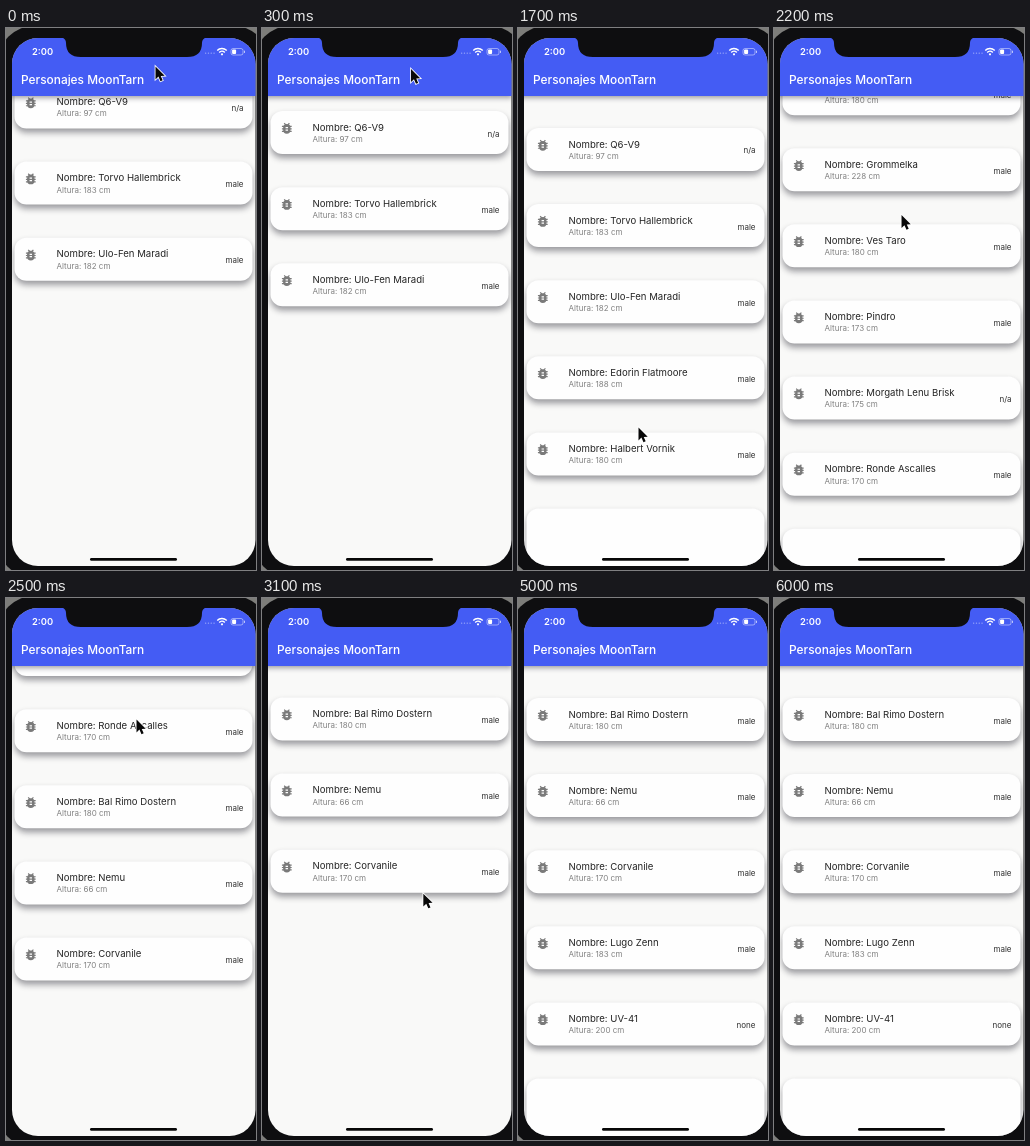
An HTML page with a canvas that plays this animation: 250 by 542 pixels, repeating every 6.5 s.

```html
<!DOCTYPE html>
<html lang="es">
<head>
<meta charset="utf-8">
<title>Personajes</title>
<style>
html, body { margin: 0; width: 100%; height: 100%; overflow: hidden; background: #0e0e10; }
canvas { display: block; width: 250px; height: 542px; }
</style>
</head>
<body>
<canvas id="stage"></canvas>
<script>
const W = 250, H = 542, LOOP = 6500;
const ROW = 76.1, FIRST_TOP = 100, CARD_H = 43, BAR_BOTTOM = 68;
const FONT = 'Inter, Roboto, sans-serif';
const BLUE = '#445cf4', PAPER = '#f9f9f8', BEZEL = '#0e0e10';
const WHITE = '#fff', CARD = '#fefefe', ICON = '#7a7a7a';

const people = [
  ['Q6-V9', 97, 'n/a'],
  ['Torvo Hallembrick', 183, 'male'],
  ['Ulo-Fen Maradi', 182, 'male'],
  ['Edorin Flatmoore', 188, 'male'],
  ['Halbert Vornik', 180, 'male'],
  ['Grommelka', 228, 'male'],
  ['Ves Taro', 180, 'male'],
  ['Pindro', 173, 'male'],
  ['Morgath Lenu Brisk', 175, 'n/a'],
  ['Ronde Ascalles', 170, 'male'],
  ['Bal Rimo Dostern', 180, 'male'],
  ['Nemu', 66, 'male'],
  ['Corvanile', 170, 'male'],
  ['Lugo Zenn', 183, 'male'],
  ['UV-41', 200, 'none'],
  ['Ossim', 190, 'male']
];

// Time in ms, then the values at that time.
const scrollKeys = [
  [0, 42.5], [100, 41], [300, 17], [500, 4], [700, 0], [1700, 0],
  [1900, 60], [2100, 240], [2300, 480], [2500, 673], [2700, 784],
  [2800, 792], [3100, 761.5], [3300, 761]
];
const cursorKeys = [
  [0, 149.5, 38.5], [700, 147.5, 50.5], [900, 146, 70], [1500, 121, 392],
  [1700, 120.5, 399.5], [1900, 122, 350], [2300, 129, 150], [2500, 130.5, 121.5],
  [2700, 138, 150], [3100, 161.3, 295.5], [3300, 165, 312], [3500, 168, 320],
  [3900, 205, 545]
];

const canvas = document.getElementById('stage');
const ctx = canvas.getContext('2d');
const dpr = window.devicePixelRatio || 1;
canvas.width = Math.round(W * dpr);
canvas.height = Math.round(H * dpr);

// Monotone cubic interpolation through the keys.
function sample(keys, t, column = 1) {
  const last = keys.length - 1;
  if (t >= keys[last][0]) return keys[last][column];
  let i = 0;
  while (t >= keys[i + 1][0]) i++;
  const slope = k => (keys[k + 1][column] - keys[k][column]) / (keys[k + 1][0] - keys[k][0]);
  const tangent = k => {
    if (k === 0 || k === last) return 0;
    const a = slope(k - 1), b = slope(k);
    return a * b <= 0 ? 0 : 2 * a * b / (a + b);
  };
  const span = keys[i + 1][0] - keys[i][0];
  const u = (t - keys[i][0]) / span, v = 1 - u;
  return keys[i][column] * (1 + 2 * u) * v * v + tangent(i) * span * u * v * v +
    keys[i + 1][column] * u * u * (3 - 2 * u) - tangent(i + 1) * span * u * u * v;
}

function box(x, y, w, h, r, color) {
  ctx.fillStyle = color;
  ctx.beginPath();
  ctx.roundRect(x, y, w, h, r);
  ctx.fill();
}

function text(str, x, y, size, color, weight = 400, align = 'left') {
  ctx.font = `${weight} ${size}px ${FONT}`;
  ctx.fillStyle = color;
  ctx.textAlign = align;
  ctx.fillText(str, x, y);
}

function withShadow(color, blur, dy, draw) {
  ctx.save();
  ctx.shadowColor = color;
  ctx.shadowBlur = blur * dpr;
  ctx.shadowOffsetY = dy * dpr;
  draw();
  ctx.restore();
}

function bug(cx, cy) {
  ctx.save();
  ctx.translate(cx, cy);
  ctx.scale(0.61, 0.61);
  box(-6, -7, 12, 16, 6, ICON);
  for (const y of [-4, 0, 4]) box(-8, y, 16, 2, 0, ICON);
  ctx.strokeStyle = ICON;
  ctx.lineWidth = 2;
  ctx.beginPath();
  for (const side of [-1, 1]) {
    ctx.moveTo(side * 4.3, -8.3);
    ctx.lineTo(side * 1.5, -5.5);
  }
  ctx.stroke();
  for (const y of [-2, 2]) box(-2, y, 4, 2, 0, CARD);
  ctx.restore();
}

function card([name, height, gender], top) {
  const pending = top > 470;
  withShadow('rgba(20,20,30,0.42)', 6, 4, () =>
    box(8.5, top, 238, pending ? 76 : CARD_H, 12, CARD));
  if (pending) return;
  bug(24.8, top + 17.2);
  text('Nombre: ' + name, 50.5, top + 19.6, 9.6, '#242424');
  text(`Altura: ${height} cm`, 50.5, top + 30.9, 8, '#808080');
  text(gender, 237.5, top + 25.5, 8, '#303030', 400, 'right');
}

function statusBar() {
  text('2:00', 26, 27, 9.4, WHITE, 600);
  for (let i = 0; i < 4; i++) box(199 + i * 2.8, 24.5, 1.3, 1.3, 0.6, 'rgba(255,255,255,0.45)');
  ctx.strokeStyle = WHITE;
  ctx.lineWidth = 1.5;
  for (const r of [3.8, 6.5]) {
    ctx.beginPath();
    ctx.arc(216, 27, r, -Math.PI * 0.76, -Math.PI * 0.24);
    ctx.stroke();
  }
  box(214.9, 25.2, 2.2, 2.2, 1.1, WHITE);
  ctx.lineWidth = 0.7;
  ctx.strokeStyle = 'rgba(255,255,255,0.65)';
  ctx.beginPath();
  ctx.roundRect(225, 20.5, 12, 6.5, 2);
  ctx.stroke();
  box(226.1, 21.6, 4, 4.3, 1, WHITE);
  box(238, 22.6, 1, 2.4, 0.5, 'rgba(255,255,255,0.65)');
}

function notch() {
  ctx.fillStyle = BEZEL;
  ctx.beginPath();
  ctx.moveTo(54, 9);
  ctx.quadraticCurveTo(60, 10, 60, 15);
  ctx.quadraticCurveTo(60, 29, 75, 29);
  ctx.lineTo(181, 29);
  ctx.quadraticCurveTo(196, 29, 196, 15);
  ctx.quadraticCurveTo(196, 10, 202, 9);
  ctx.fill();
}

function pointer(x, y) {
  ctx.save();
  ctx.translate(x, y);
  ctx.scale(0.92, 0.92);
  ctx.beginPath();
  for (const [px, py] of [[0, 0], [0, 14], [3.2, 11], [5.4, 16], [7.8, 15], [5.7, 10.2], [10, 10]]) ctx.lineTo(px, py);
  ctx.closePath();
  ctx.lineWidth = 1.8;
  ctx.strokeStyle = WHITE;
  ctx.stroke();
  ctx.fillStyle = '#080808';
  ctx.fill();
  ctx.restore();
}

function draw(t) {
  ctx.setTransform(dpr, 0, 0, dpr, 0, 0);
  box(0, 0, W, H, 0, '#7d7d7a');
  box(-8, -2, 271.5, 552, 36, BEZEL);

  ctx.save();
  ctx.beginPath();
  ctx.roundRect(6, 10, 243.5, 528, 26);
  ctx.clip();
  box(0, 0, W, H, 0, PAPER);

  const scroll = sample(scrollKeys, t);
  const loaded = t < 1000 ? 3 : t < 3500 ? 13 : 16;
  people.slice(0, loaded).forEach((person, i) => {
    const top = FIRST_TOP + i * ROW - scroll;
    if (top + CARD_H > BAR_BOTTOM && top < H) card(person, top);
  });

  withShadow('rgba(20,20,30,0.4)', 5, 2, () => box(0, 0, W, BAR_BOTTOM, 0, BLUE));
  text('Personajes MoonTarn', 15, 55.8, 11.9, WHITE, 500);
  statusBar();
  notch();
  box(84, 530, 87, 2.8, 1.4, '#080808');
  ctx.restore();

  if (t < 3900) pointer(sample(cursorKeys, t, 1), sample(cursorKeys, t, 2));
}

const start = performance.now();
function tick() {
  draw((performance.now() - start) % LOOP);
  requestAnimationFrame(tick);
}
tick();
</script>
</body>
</html>
```
